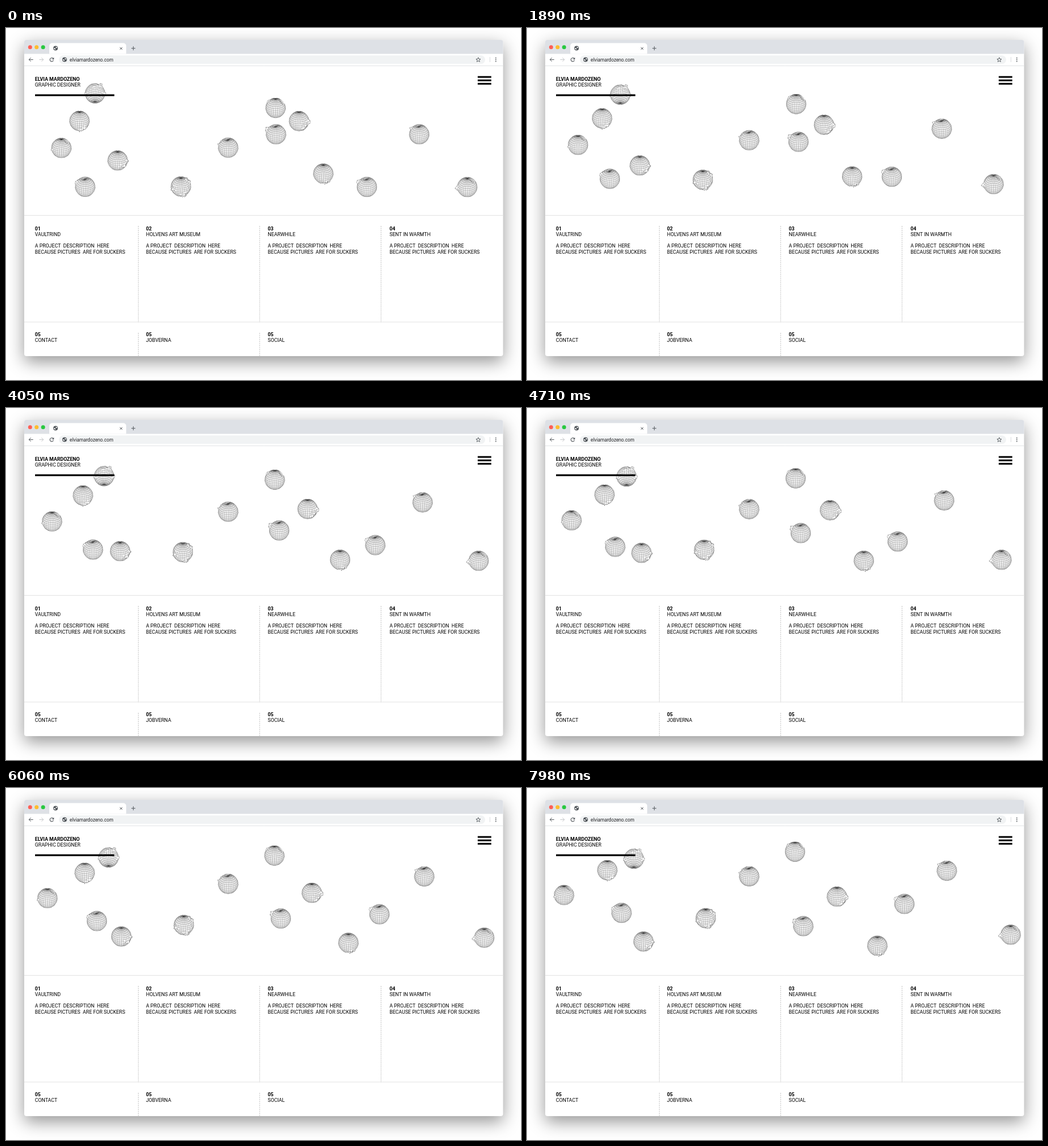
Animation of 904 by 619 pixels, one loop 8000 ms. Source, as an HTML page with a canvas:

```html
<!DOCTYPE html>
<html lang="en">
<head>
<meta charset="utf-8">
<title>Portfolio</title>
<style>
html, body { margin: 0; width: 100%; height: 100%; overflow: hidden; background: #fff; }
canvas { display: block; width: 904px; height: 619px; }
</style>
</head>
<body>
<canvas id="stage"></canvas>
<script>
const W = 904, H = 619, LOOP = 8000, STEP = 30, TRAVEL = 7980;
const RADIUS = 17.3, ROWS = 16, COLS = 32, TILT = 0.5;
const FONT = 'Roboto, Arial, sans-serif';
const ratio = window.devicePixelRatio || 1;

function setup(canvas) {
  canvas.width = W * ratio;
  canvas.height = H * ratio;
  const c = canvas.getContext('2d');
  c.scale(ratio, ratio);
  return c;
}
const ctx = setup(document.getElementById('stage'));
const page = document.createElement('canvas');

// Distorted patches: x, y on the visible face, strength (negative = cut), reach
const STYLES = {
  cap: [[-0.85, -0.5, 0.3, 0.3], [-0.12, -0.86, -0.12, 0.34]],
  fringe: [[0.5, 0.58, 0.26, 0.55], [0.92, 0.05, 0.3, 0.3]],
  hem: [[0.42, 0.75, 0.22, 0.45], [0, 0.96, 0.2, 0.35]],
  beak: [[-0.98, 0.1, 0.28, 0.3], [0.58, -0.68, -0.13, 0.36]],
  wild: [[0.7, -0.6, 0.32, 0.45], [-0.75, 0.2, 0.28, 0.5], [0.25, 0.78, 0.28, 0.5], [0.85, 0, 0.25, 0.35]],
  nick: [[0.72, -0.58, -0.12, 0.4], [-0.7, -0.68, 0.15, 0.25]],
  flip: [[0.45, -0.85, 0.26, 0.48], [-0.88, 0.2, 0.28, 0.36], [0.9, 0.1, 0.28, 0.34], [0, -0.5, 0.18, 0.5]]
};

// style, start x, start y, end x, end y
const GLOBES = [
  ['flip', 156.3, 115, 187.5, 124.5],
  ['hem', 129, 163.3, 141, 144.5],
  ['beak', 97.2, 211, 65, 188.3],
  ['fringe', 196, 233, 204.5, 270],
  ['cap', 139, 279.3, 166, 219.7],
  ['wild', 307, 278.7, 313.7, 229],
  ['cap', 390, 210.5, 390, 155.3],
  ['nick', 473.2, 140.5, 470.5, 112],
  ['cap', 474, 187, 485, 243],
  ['fringe', 514.3, 163.7, 544, 191],
  ['hem', 557, 256, 615, 277.3],
  ['cap', 633.5, 279.5, 662.5, 204],
  ['cap', 725.3, 187, 737, 145.5],
  ['beak', 809.7, 279.7, 849, 258]
].map(([style, x0, y0, x1, y1], i) => ({ x0, y0, x1, y1, mesh: buildMesh(style, i + 1) }));

function random(seed) {
  return () => (seed = (seed * 16807) % 2147483647) / 2147483647;
}

function buildMesh(style, seed) {
  const rnd = random(seed * 7919 + 11);
  const sign = style === 'flip' ? -1 : 1;
  const dents = STYLES[style].map(([x, y, s, reach]) =>
    ({ x, y, z: Math.sqrt(Math.max(0, 1 - x * x - y * y)), s, reach }));
  const mesh = [];
  for (let i = 0; i <= ROWS; i++) {
    const row = [], a = Math.PI * i / ROWS;
    for (let j = 0; j < COLS; j++) {
      const b = 2 * Math.PI * j / COLS;
      const py = -Math.cos(a), pz = Math.sin(a) * Math.sin(b);
      const x = sign * Math.sin(a) * Math.cos(b);
      const y = sign * (py * Math.cos(TILT) + pz * Math.sin(TILT));
      const z = -py * Math.sin(TILT) + pz * Math.cos(TILT);
      const h = rnd();
      let k = 1;
      for (const d of dents) {
        const w = Math.max(0, 1 - Math.hypot(x - d.x, y - d.y, z - d.z) / d.reach);
        if (d.s < 0) k += d.s * Math.min(1, 2.5 * w);
        else k += d.s * Math.min(1, 1.5 * w) * (h > 0.55 ? h : -0.3 * h);
      }
      row.push([x * k, y * k, z * k]);
    }
    mesh.push(row);
  }
  return mesh;
}

function drawGlobe(g, p) {
  const cx = g.x0 + (g.x1 - g.x0) * p, cy = g.y0 + (g.y1 - g.y0) * p;
  // globes high on the page are seen slightly from below
  const e = (cy - 200) * 0.0007, ce = Math.cos(e), se = Math.sin(e);
  const pts = g.mesh.map(row => row.map(([x, y, z]) =>
    [cx + RADIUS * x, cy + RADIUS * (y * ce + z * se), z * ce - y * se]));
  const faces = [];
  for (let i = 0; i < ROWS; i++) {
    for (let j = 0; j < COLS; j++) {
      const n = (j + 1) % COLS;
      const f = [pts[i][j], pts[i][n], pts[i + 1][n], pts[i + 1][j]];
      f.depth = f[0][2] + f[1][2] + f[2][2] + f[3][2];
      if (f.depth > 0) faces.push(f);
    }
  }
  faces.sort((a, b) => a.depth - b.depth);
  for (const f of faces) {
    ctx.beginPath();
    for (const [x, y] of f) ctx.lineTo(x, y);
    ctx.closePath();
    ctx.fill();
    ctx.stroke();
  }
}

function box(c, x, y, w, h, r, color) {
  c.fillStyle = color;
  c.beginPath();
  c.roundRect(x, y, w, h, r);
  c.fill();
}

function disc(c, x, y, r, color) {
  c.fillStyle = color;
  c.beginPath();
  c.arc(x, y, r, 0, 2 * Math.PI);
  c.fill();
}

function line(c, points, color, width = 1, dash = []) {
  c.strokeStyle = color;
  c.lineWidth = width;
  c.setLineDash(dash);
  c.beginPath();
  for (let i = 0; i < points.length; i += 2) c.lineTo(points[i], points[i + 1]);
  c.stroke();
  c.setLineDash([]);
}

function text(c, str, x, y, weight = 400, size = 8.75, color = '#000') {
  c.font = `${weight} ${size}px ${FONT}`;
  c.fillStyle = color;
  c.fillText(str, x, y);
}

function worldIcon(c, x, y) {
  disc(c, x, y, 4, '#50555a');
  c.fillStyle = '#fff';
  c.beginPath();
  c.ellipse(x - 1.5, y + 0.7, 1.8, 1, 0.6, 0, 2 * Math.PI);
  c.ellipse(x + 1.5, y - 1.4, 1.5, 0.9, 0.3, 0, 2 * Math.PI);
  c.fill();
}

function drawChrome(c) {
  c.save();
  c.shadowColor = 'rgba(0,0,0,0.42)';
  c.shadowBlur = 30 * ratio;
  c.shadowOffsetY = 10 * ratio;
  box(c, 32, 21, 840.5, 556, 4, '#fff');
  c.restore();
  box(c, 32, 21, 840.5, 24.5, [4, 4, 0, 0], '#dee1e6');
  ['#ff5f57', '#fdbc2e', '#28c840'].forEach((col, i) => disc(c, 42.3 + 11.4 * i, 33.7, 3.5, col));

  box(c, 76, 26.5, 135, 19, [5, 5, 0, 0], '#fff');
  worldIcon(c, 87, 35.6);
  line(c, [199.8, 33.8, 204.2, 38.2], '#5f6368');
  line(c, [204.2, 33.8, 199.8, 38.2], '#5f6368');
  line(c, [220, 35.7, 227, 35.7], '#5f6368', 1.1);
  line(c, [223.5, 32.2, 223.5, 39.2], '#5f6368', 1.1);

  const arrow = (x, dir, col) => {
    line(c, [x - 3.7, 55.6, x + 3.7, 55.6], col);
    line(c, [x + dir * 0.4, 52.3, x + dir * 3.7, 55.6, x + dir * 0.4, 58.9], col);
  };
  arrow(44, -1, '#50555a');
  arrow(62, 1, '#c4c6c9');
  c.strokeStyle = '#50555a';
  c.lineWidth = 1.1;
  c.beginPath();
  c.arc(80.3, 55.7, 3.2, 0.3, 5.5);
  c.stroke();
  c.fillStyle = '#50555a';
  c.beginPath();
  c.moveTo(84.2, 51.8);
  c.lineTo(84.2, 55.2);
  c.lineTo(80.8, 55.2);
  c.fill();

  box(c, 93, 48.3, 748, 14.8, 7.4, '#f1f3f4');
  worldIcon(c, 102.8, 55.6);
  text(c, 'elviamardozeno.com', 111.8, 58.5, 400, 8.25, '#202124');
  const star = [];
  for (let i = 0; i <= 10; i++) {
    const a = -Math.PI / 2 + i * Math.PI / 5, r = i % 2 ? 1.8 : 4.2;
    star.push(829 + r * Math.cos(a), 56 + r * Math.sin(a));
  }
  line(c, star, '#50555a', 0.9);
  line(c, [849.5, 51, 849.5, 60], '#dadce0');
  [52.7, 55.7, 58.7].forEach(y => disc(c, 859.8, y, 0.9, '#50555a'));
  line(c, [32, 66.5, 872.5, 66.5], '#e2e4e6');
}

function drawPage() {
  const c = setup(page);
  c.fillStyle = '#fff';
  c.fillRect(0, 0, W, H);
  drawChrome(c);

  text(c, 'ELVIA MARDOZENO', 50.8, 93.2, 700);
  text(c, 'GRAPHIC DESIGNER', 50.8, 103.3);
  c.fillStyle = '#000';
  [84.6, 90.6, 96.6].forEach(y => c.fillRect(828, y, 23.8, 3));

  line(c, [32, 329.5, 872.5, 329.5], '#e2e2e2');
  line(c, [32, 517, 872.5, 517], '#e2e2e2');
  [232.3, 445.2, 658.3].forEach((x, i) => {
    line(c, [x, 348, x, 517], '#bdbdbd', 1, [2, 1.5]);
    if (i < 2) line(c, [x, 536, x, 577], '#bdbdbd', 1, [2, 1.5]);
  });

  const left = [50.8, 245.7, 459.5, 673.2];
  ['VAULTRIND', 'HOLVENS ART MUSEUM', 'NEARWHILE', 'SENT IN WARMTH'].forEach((name, i) => {
    text(c, '0' + (i + 1), left[i], 355.7, 700);
    text(c, name, left[i], 366);
    text(c, 'A PROJECT  DESCRIPTION  HERE', left[i], 386.4);
    text(c, 'BECAUSE PICTURES  ARE FOR SUCKERS', left[i], 396.7);
  });
  ['CONTACT', 'JOBVERNA', 'SOCIAL'].forEach((name, i) => {
    text(c, '05', left[i], 541.8, 700);
    text(c, name, left[i], 552);
  });
}

function frame() {
  const t = Math.floor((performance.now() % LOOP) / STEP) * STEP;
  ctx.drawImage(page, 0, 0, W, H);
  ctx.fillStyle = '#fff';
  ctx.strokeStyle = 'rgba(0,0,0,0.55)';
  ctx.lineWidth = 0.32;
  ctx.lineJoin = 'round';
  for (const g of GLOBES) drawGlobe(g, t / TRAVEL);
  ctx.fillStyle = '#000';
  ctx.fillRect(51, 116.6, 139.2, 3.2);
  requestAnimationFrame(frame);
}

drawPage();
frame();
</script>
</body>
</html>
```
